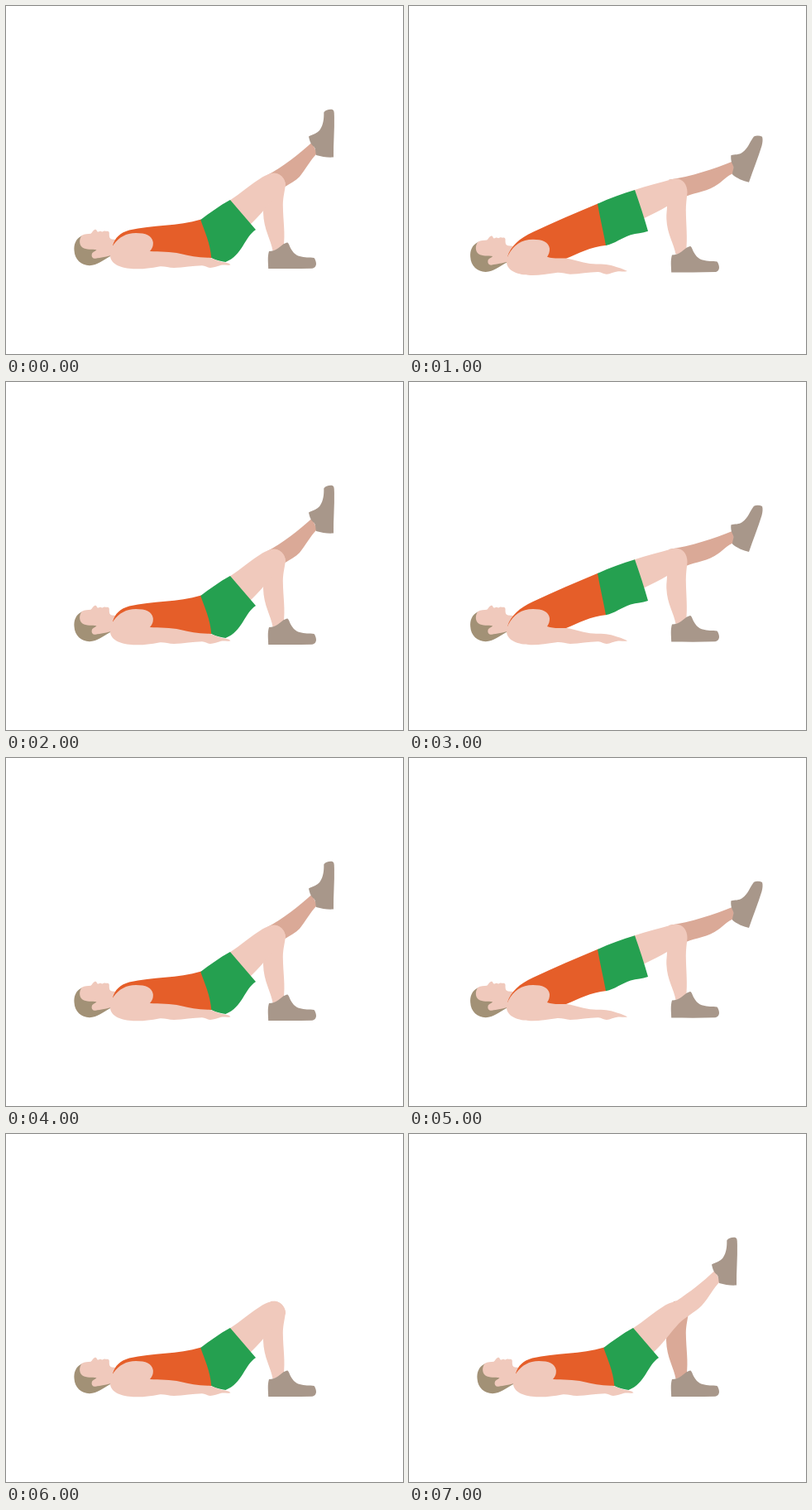
Animation of 480x420 px, one loop 8000 ms. Source, as an HTML page:

```html
<!DOCTYPE html>
<html lang="en">
<head>
<meta charset="utf-8">
<title>Single-leg bridge</title>
<style>
html, body { margin: 0; width: 100%; height: 100%; overflow: hidden; background: #fff; }
svg { display: block; width: 100vw; height: 100vh; }
.skin { fill: #f0c9bc; }
.far { fill: #daa997; }
.shoe { fill: #a8978a; }
.hair { fill: #a29176; }
.top { fill: #e55e29; }
.shorts { fill: #25a050; }
</style>
</head>
<body>
<svg viewBox="0 0 480 420">
  <defs>
    <g id="head">
      <path class="hair" d="M92 277C84 281 82 288 82.5 295C83 306 91 313 101 313.2C111 313 116 307 128 301L112 288Z"/>
      <path class="skin" d="M91.500 277C95 275 99 275.500 102.500 274.800C104.500 273.500 105 270.500 107.500 269.800C110 269.500 109.500 272 111 272.600C112.500 272.800 112.500 271.300 114.500 271.800C116 272.500 116.500 272.800 118 271.700C120 271 120.500 272 122 271.800C125 271.500 125 274 124.800 276C124.800 279 125.500 281 128 281.500L134 282L130 300C122 303 114 303.500 108.500 304.800C105 305.200 103 302.500 103.800 299.500C104.300 297 107.500 296.500 109.500 294.300C104 293.700 97 294.300 92.500 291.500C88.500 288.500 88 282 91.500 277Z"/>
    </g>
    <path id="floorShoe" class="shoe" d="M318 296C322 296 326 294.500 329.500 292C333 289.500 336 286 340.500 285.500C342.500 287 342.500 290 344.500 293C347.500 298 350 300.500 355 302C361 304 367 303 372.500 304C374 306 375 308.500 375 311.500C374.500 314.500 373.500 316 370 316.700C352 317.300 334 317 317.200 317C317 309 316 303 318 296Z"/>
  </defs>

  <g id="low">
    <use href="#head"/>
    <path id="lowShin" class="far" d="M316 204C334 195 354 179 370 164.500L376 178C368 186 363 196 355 206C350 211 344 214 336 219Z"/>
    <path id="lowStand" d="M320 202C330 200 337 207 338 215C337 224 335 230 334.800 240C335 260 338 274 335.500 292L322.500 295.500C320.500 282 311.500 270 311 249L312 228Z"/>
    <path id="lowThigh" class="skin" d="M270 235C284 226 296 215 310 206.500C315 204 321 201 327 202C334 204 338 210 338 217L324 232C315 242 308 252 295 264Z"/>
    <path id="lowLeg" class="skin" d="M270 235C284 226 296 215 310 206.500C315 203.500 319 203.500 324 201C339 191 355 179 370 164.500L376 178C368 186 363 197 354 207C346 215 334 221 326 229C315 241 308 252 295 264Z"/>
    <path id="lowFoot" class="shoe" d="M366 157.500C371 155 376 154 379.500 149.500C384 143 384.500 135 384.300 128.500C386 125.500 390 124.500 394 124.800C397 125.500 396.800 129 396.900 133C397.300 150 395.700 166 396 182.500C389 183 382 182 375 180C374 176 374.700 172 372 169.500C368 166.500 367 162 366 157.500Z"/>
    <use href="#floorShoe"/>
    <path class="top" d="M129 289C132 280 137 274 149 270.500C177 264 208 266 236 257.500C240 270 248 286 249 304C220 306 195 302 170 299Z"/>
    <path class="shorts" d="M235.300 258C246 250 258 241 271 234L302 270C288 279 286 301 265.500 309C260 308 254 307 248.300 304C247 286 240 272 235.300 258Z"/>
    <path class="skin" d="M130 288C137 279 145 274 157 274C169 274 176.500 277 177.800 285C178.200 290 176.500 293 174 296C185 296.500 199 296.200 211 299C222 301.800 233 304 246 303.700C253 305.500 257 308.500 264 309.200C268 310 271 311 271.500 312.200C268 313.500 264 312 260 312.800C256 313.700 251 316 247 316C243 315.500 241 313.300 237 313.200C226 313.300 215 315.800 203 316C196 316 191 313.700 185 314.500C174 316.500 164 317.800 154 317.200C140 316.800 127 312 126 302C126 296 128 292 130 288Z"/>
  </g>

  <g id="high">
    <use href="#head" x="-8.300"/>
    <path class="far" d="M314 202C341 198 369 189 392 179.500L393 194C384 197 380 203 374 207C362 216 347 217 335 222Z"/>
    <path class="skin" d="M272 214.500C288 209 303 206 318 201.300C330 198.500 336.500 207 336.500 217C335.800 225 334.800 231 334.800 239C335 257 337 272 335 289L322.500 292C320.500 279 312 268 311.300 249C311 243 312 239 312 234C304 239 293 244 283 249Z"/>
    <path class="shoe" d="M389.300 172.500C394 171.200 399 172 403 169C410 164 412 156 417 149.700C420 148.300 424 148.500 427 150C428 153 427.500 157 426.500 161C422 176 416 190 411 205C404 203.500 396 200 391 195.500C391 191 393.500 188 391.500 184C389.500 181 389 177 389.300 172.500Z"/>
    <use href="#floorShoe" y="-3.400"/>
    <path class="top" d="M119 295C123 282 133 273 150 265C175 253 202 242 229 230.500L239 281C219 283 205 291 190 297L164 297Z"/>
    <path class="shorts" d="M228 231C243 224 258 219 273 214.300C279 231 284 247 289 264C282 266.500 275 266.500 268 268.500C257 272 249 279 238 281.300C235 265 231 248 228 231Z"/>
    <path class="skin" d="M120 293C126 281 136 274 150 274C161 274 169 277 170 285C170.200 289 169 292 167 295C175 298 183 296.500 191 297C202 299 212 303 223 303.500C231 304 240 303.500 247 306C253 308 259 309.500 264 312.300C261 313.500 257 312 253 312.500C248 313 243 315.800 239 316C235 315.700 233 313.500 229 313.200C218 313 207 315.800 195 316C189 315.500 184 313.500 178 314.200C167 315.800 157 317.500 147 317.200C132 317 119 312 118 302C118 298 118.500 296 120 293Z"/>
  </g>
</svg>
<script>
const get = id => document.getElementById(id);
const STEP = 1000;
const poses = ["bent", "highLow", "bent", "high", "bent", "high", "rest", "swap"]
  .map((name, i) => i === 0 || i === 2 || i === 4 ? "raised" : name);
const show = (id, on) => get(id).setAttribute("display", on ? "inline" : "none");

function render(ms) {
  const pose = poses[Math.floor(ms / STEP) % poses.length];
  const high = pose.startsWith("high");
  show("high", high);
  show("low", !high);
  get("high").setAttribute("transform", `translate(0 ${pose === "highLow" ? 7.8 : 0})`);
  show("lowShin", pose === "raised");
  show("lowThigh", pose !== "swap");
  show("lowLeg", pose === "swap");
  show("lowFoot", pose !== "rest");
  get("lowStand").setAttribute("class", pose === "swap" ? "far" : "skin");
}

const start = performance.now();
function tick() {
  render(performance.now() - start);
  requestAnimationFrame(tick);
}
render(0);
requestAnimationFrame(tick);
</script>
</body>
</html>
```
